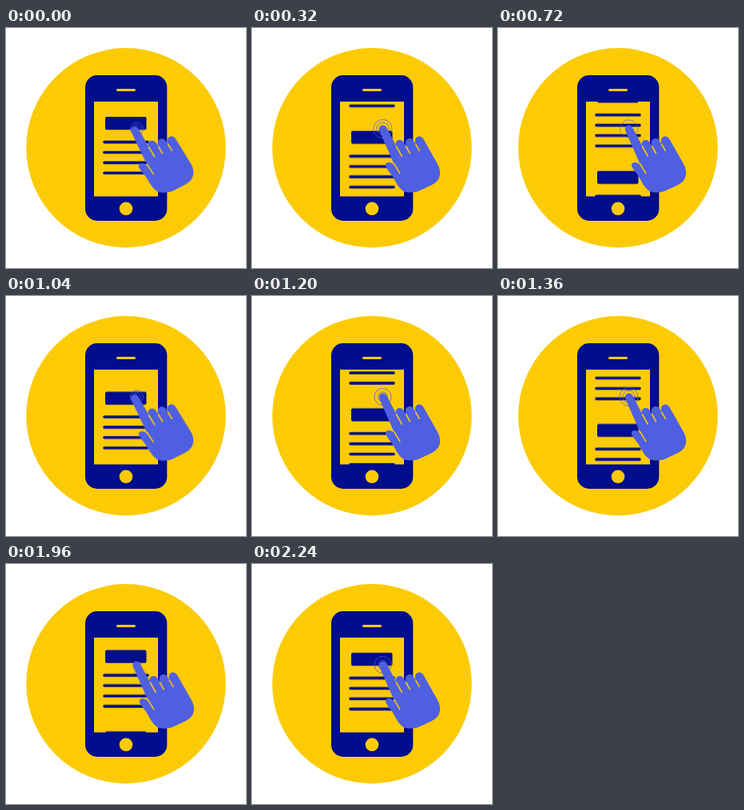
Recreate the animation shown at these times as an HTML page without scripts. Size 300 by 300 pixels, loop 2.28 s.

```html
<!DOCTYPE html>
<html lang="en">
<head>
<meta charset="utf-8">
<title>Scrolling phone</title>
<style>
html, body { margin: 0; width: 100%; height: 100%; overflow: hidden; background: #fff; }
svg { display: block; width: 100vw; height: 100vh; }
:root { --navy: #000d8c; --sun: #fccb05; --skin: #4f5fe1; }
.navy { fill: var(--navy); }
.sun { fill: var(--sun); }
.line { stroke: var(--navy); stroke-width: 3.6; stroke-linecap: round; }
.ring { fill: none; stroke: var(--skin); stroke-width: .9; }
.gap { fill: none; stroke: var(--sun); stroke-width: 1.6; stroke-linecap: round; }

#feed { animation: scroll 2.28s infinite; }
#outer { animation: outer 2.28s linear infinite; }
#inner { animation: inner 2.28s linear infinite; }
#hand { transform-origin: 205px 190px; animation: press 2.28s ease-in-out infinite; }

/* Two full feed lengths per loop, easing in and out */
@keyframes scroll {
  0% { transform: translateY(0); animation-timing-function: cubic-bezier(.333, 0, .667, .415); }
  14.035% { transform: translateY(17.5px); animation-timing-function: cubic-bezier(.333, .256, .667, .645); }
  31.579% { transform: translateY(67.5px); animation-timing-function: cubic-bezier(.333, .334, .667, .668); }
  45.614% { transform: translateY(110px); animation-timing-function: cubic-bezier(.333, .347, .667, .692); }
  59.649% { transform: translateY(150.2px); animation-timing-function: cubic-bezier(.333, .379, .667, .735); }
  73.684% { transform: translateY(183.3px); animation-timing-function: cubic-bezier(.333, .656, .667, 1); }
  94.737%, 100% { transform: translateY(203.2px); }
}
/* Tap beat of 1040 ms, cut by the end of the loop */
@keyframes press {
  0%, 45.614%, 91.228% { transform: translateX(-.5px) rotate(-2deg); }
  7.018%, 38.596%, 52.632%, 84.211%, 98.246%, 100% { transform: none; }
}
@keyframes outer {
  0%, 45.614%, 91.228% { r: 8px; opacity: .9; }
  7.018%, 52.632%, 98.246%, 100% { r: 10.5px; opacity: .9; }
  14.035%, 59.649% { r: 11.5px; opacity: .8; }
  31.579%, 77.193% { r: 11.2px; opacity: .5; }
  38.596%, 84.211% { r: 11.2px; opacity: 0; }
  38.7%, 84.3% { r: 4px; opacity: 0; }
}
@keyframes inner {
  0%, 45.614%, 91.228% { r: 4.8px; opacity: .9; }
  7.018%, 52.632%, 98.246%, 100% { r: 6px; opacity: .9; }
  14.035%, 59.649% { r: 7.8px; opacity: .8; }
  28.07%, 73.684% { r: 11px; opacity: .4; }
  38.596%, 84.211% { r: 11.2px; opacity: 0; }
  38.7%, 84.3% { r: 3px; opacity: 0; }
}
</style>
</head>
<body>
<svg viewBox="0 0 300 300">
  <defs>
    <clipPath id="screen"><rect x="110" y="92" width="80" height="118.5"/></clipPath>
    <g id="card">
      <rect class="navy" x="124" y="111" width="51.5" height="16.3" rx="2"/>
      <path class="line" d="M123 142.6h54M123 155.5h54M123 168.4h54M123 181.3h54"/>
    </g>
  </defs>

  <circle class="sun" cx="150" cy="149.7" r="124.7"/>
  <rect class="navy" x="99" y="59" width="102.3" height="182" rx="15"/>
  <rect class="sun" x="110" y="92" width="80" height="118.5"/>
  <rect class="sun" x="138" y="76" width="24" height="3" rx="1.5"/>
  <circle class="sun" cx="150" cy="225.8" r="8.3"/>

  <g clip-path="url(#screen)">
    <g id="feed">
      <use href="#card"/>
      <use href="#card" y="-101.6"/>
      <use href="#card" y="-203.2"/>
    </g>
  </g>

  <circle id="outer" class="ring" cx="163.5" cy="126" r="8"/>
  <circle id="inner" class="ring" cx="163.5" cy="126" r="4.8"/>

  <g id="hand">
    <path fill="#4f5fe1" d="M159.6 129.2C157.8 125.5 159.6 122.6 162 121.8C164.6 121 167 122.2 168.2 124.6
      L180.2 147.2C178.8 143.4 180.6 140.8 183 140.2C186 139.4 188.2 140.6 189.8 143.2L192.4 147.6
      C190.8 142.8 192.2 139.2 195.4 138.2C198.2 137.4 200.6 138.6 202 141.2L204.4 145
      C203 140.8 204 137 207 135.9C210 134.9 212.8 136.2 214.4 139
      L232.2 170.4C235.8 177 236 184 233 189C230.4 193.4 226 195.6 221 198
      L209 203.4C202.6 206.2 192.8 206.6 187.4 202.4C182.6 198.6 179.8 192.6 177 187.4
      C174.2 182.4 169.8 178.4 167.4 173.2C165.8 169.8 168.4 167.6 171.4 168
      C175 168.4 177 170.4 178.6 172.4Z"/>
    <path class="gap" d="M180.4 148l6.8 12.2M192.6 148l4.8 8.6M204.6 145.4l4.6 8M177.6 169.6l7.2 12"/>
  </g>
</svg>
</body>
</html>
```
